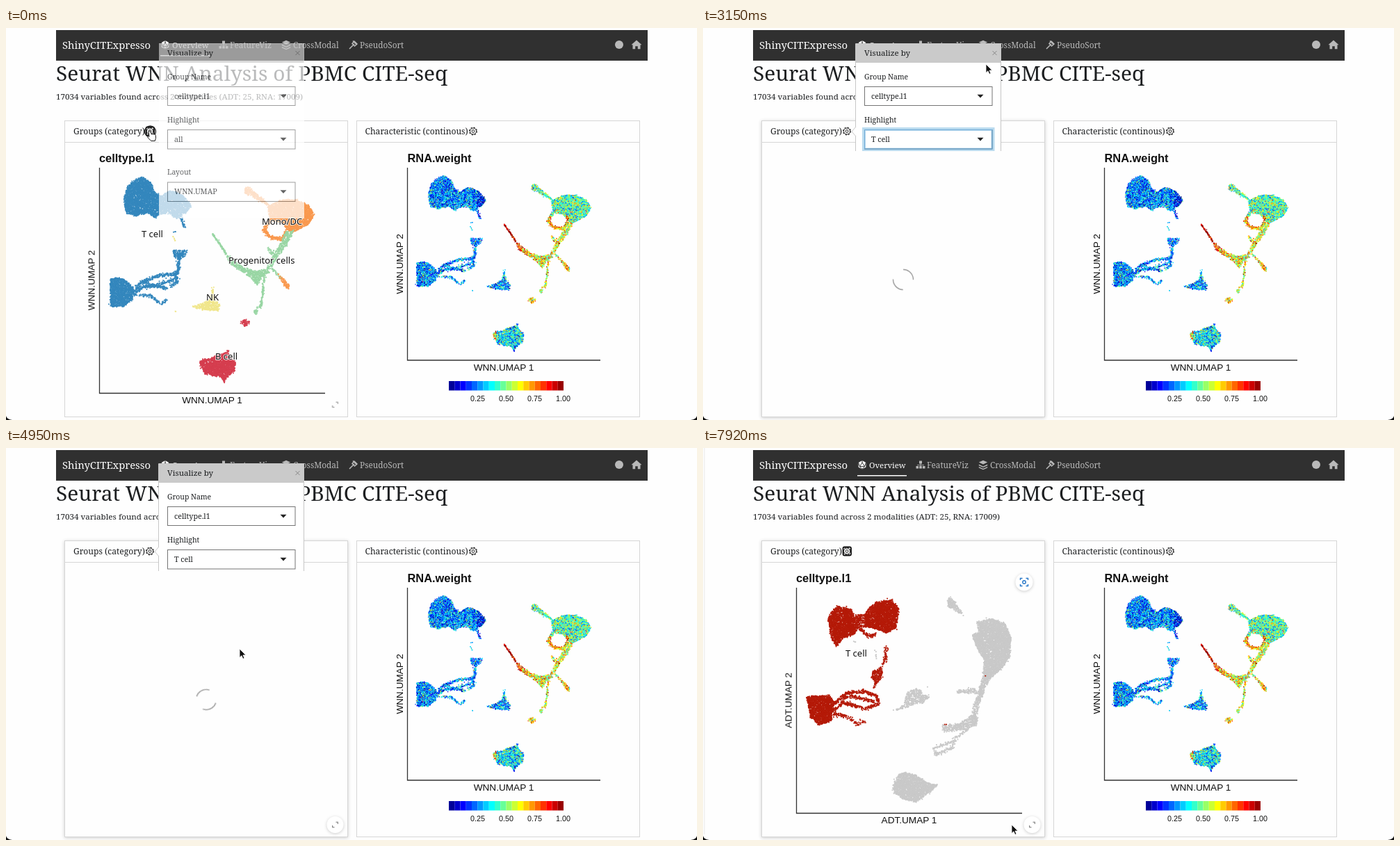
Recreate the animation shown at these times as an HTML page with a canvas. Size 994 by 564 pixels, loop 8 s.

```html
<!DOCTYPE html>
<html lang="en">
<head>
<meta charset="utf-8">
<title>ShinyCITExpresso</title>
<style>
html, body { margin: 0; width: 100%; height: 100%; overflow: hidden; background: #fefefe; }
canvas, svg, .card { position: absolute; left: 0; top: 0; }
.card { box-sizing: border-box; left: 84px; top: 133px; width: 408px; height: 427px; background: #fefefe; border: 1px solid #d6d6d6; }
.card.right { left: 503.5px; }
text { font: 12.1px "Noto Serif", serif; fill: #1d1f21; }
.title { font-size: 29.9px; }
.sub { font-size: 11.65px; }
.brand { font-size: 14.8px; font-weight: 500; fill: #fff; }
.nav text { font-size: 11.8px; fill: #b9b9b9; }
.nav .on { font-weight: 500; font-size: 11.4px; fill: #fff; }
.pop text { font-size: 10.7px; }
.pop .label { font-size: 10.4px; }
.pop .head { font-size: 11.5px; }
.pop .inv { fill: #fff; }
.box { fill: #fff; stroke: #747474; }
.glow { fill: none; stroke: #007bc2; stroke-opacity: .27; stroke-width: 5; }
.blue { fill: none; stroke: #6fa9d6; }
.menu { fill: #fff; stroke: #c9c9c9; filter: drop-shadow(0 2px 3px #0003); }
.axis { fill: none; stroke: #333; stroke-width: 1.3; }
.plot text { font: 13.6px "Liberation Sans", Arial, sans-serif; fill: #111; }
.plot .name { font-weight: bold; font-size: 16.4px; }
.plot .tick { font-size: 10.8px; text-anchor: middle; }
.plot .mid { text-anchor: middle; }
.plot .cell { font: 13px "Noto Sans", sans-serif; paint-order: stroke; stroke: #fff; stroke-opacity: .85; stroke-width: 2px; }
.round { fill: #fff; filter: drop-shadow(0 1px 2px #0003); }

/* 1% is 80 ms */
.a { animation: 8s step-end infinite; }
#spin { animation: turn 1s linear infinite; transform-origin: 288px 362px; }
@keyframes turn { from { transform: rotate(-144deg) } to { transform: rotate(216deg) } }
@keyframes shadow { 0% { box-shadow: none } 7.5%, 100% { box-shadow: 0 1px 5px #0003 } }
@keyframes popover { 0% { opacity: .7 } 1.875% { opacity: 1 } 87.875% { opacity: .4 } 89.75%, 100% { opacity: 0 } }
@keyframes settled { 0% { opacity: 0 } 1.875%, 100% { opacity: 1 } }
@keyframes all { 0% { opacity: 1 } 33.75%, 100% { opacity: 0 } }
@keyframes picked { 0% { opacity: 0 } 33.75%, 100% { opacity: 1 } }
@keyframes red { 0% { opacity: 0 } 33.75% { opacity: 1 } 60%, 100% { opacity: 0 } }
@keyframes wnn { 0% { opacity: 1 } 60%, 100% { opacity: 0 } }
@keyframes adt { 0% { opacity: 0 } 60%, 100% { opacity: 1 } }
@keyframes focus2 { 0% { opacity: 0 } 18.75% { opacity: 1 } 50.625%, 100% { opacity: 0 } }
@keyframes focus3 { 0% { opacity: 0 } 50.625% { opacity: 1 } 84.375%, 100% { opacity: 0 } }
@keyframes edge3 { 0% { opacity: 0 } 50.625%, 100% { opacity: 1 } }
@keyframes menu2 { 0% { opacity: 0 } 18.75% { opacity: 1 } 33.75%, 100% { opacity: 0 } }
@keyframes menu3 { 0% { opacity: 0 } 52.5% { opacity: 1 } 60%, 100% { opacity: 0 } }
@keyframes hover2 { 0% { opacity: 0 } 24.375% { opacity: 1; transform: none } 26.25%, 100% { opacity: 1; transform: translateY(21.8px) } }
@keyframes hover3 { 0% { opacity: 0 } 56.25%, 100% { opacity: 1 } }
@keyframes busy { 0% { opacity: 0 } 33.75% { opacity: 1 } 43.125% { opacity: 0 } 60% { opacity: 1 } 67.5%, 100% { opacity: 0 } }
@keyframes faint { 0% { opacity: .8 } 7.5%, 100% { opacity: 0 } }
@keyframes expand { 0% { opacity: 0 } 61.875% { opacity: 1 } 75% { opacity: 0 } 89.75%, 100% { opacity: 1 } }
@keyframes zoom { 0% { opacity: 0 } 67.5% { opacity: 1 } 75% { opacity: 0 } 89.75%, 100% { opacity: 1 } }
@keyframes gear { 0% { opacity: 1 } 1.875% { opacity: 0 } 86%, 100% { opacity: 1 } }
@keyframes edge { 0% { opacity: 0 } 99%, 100% { opacity: 1 } }
@keyframes ring {
  0%, 16.875%, 31.875%, 50.625%, 58.125%, 86% { opacity: 1 }
  1.875%, 18.75%, 33.75%, 52.5%, 60%, 87.875%, 100% { opacity: 0 }
}
@keyframes hand {
  0%, 16.875%, 46.875%, 82.5% { opacity: 1 }
  9.375%, 35.625%, 60%, 89.75%, 100% { opacity: 0 }
}
@keyframes arrow {
  0%, 16.875%, 46.875%, 82.5% { opacity: 0 }
  9.375%, 35.625%, 60%, 89.75%, 100% { opacity: 1 }
}
#cursor { animation: move 8s linear infinite; }
@keyframes move {
  0% { transform: translate(207px, 149px) }
  7.5% { transform: translate(207px, 149px); animation-timing-function: steps(2, start) }
  11.25% { transform: translate(245px, 116px); animation-timing-function: steps(5, start) }
  20.625% { transform: translate(327px, 160px); animation-timing-function: steps(3, start) }
  26.25% { transform: translate(324px, 215px); animation-timing-function: steps(2, start) }
  30% { transform: translate(320px, 237px) }
  33.75% { transform: translate(320px, 237px); animation-timing-function: steps(4, start) }
  41.25% { transform: translate(407px, 52px) }
  45% { transform: translate(407px, 52px); animation-timing-function: steps(2, start) }
  48.75% { transform: translate(343px, 236px) }
  52.5% { transform: translate(343px, 236px); animation-timing-function: steps(2, start) }
  56.25% { transform: translate(338px, 269px); animation-timing-function: steps(1, start) }
  58.125% { transform: translate(336px, 289px) }
  73.125% { transform: translate(336px, 289px); animation-timing-function: steps(6, start) }
  84.375% { transform: translate(418px, 36px) }
  87.875% { transform: translate(418px, 36px); animation-timing-function: steps(7, start) }
  100% { transform: translate(444px, 542px) }
}
</style>
</head>
<body>
<div class="card a" style="animation-name:shadow"></div>
<div class="card right"></div>
<canvas id="plotAll" class="a" style="animation-name:all"></canvas>
<canvas id="plotRed" class="a" style="animation-name:red"></canvas>
<canvas id="plotAdt" class="a" style="animation-name:adt"></canvas>
<canvas id="plotWeight"></canvas>

<svg width="994" height="564" viewBox="0 0 994 564">
  <defs>
    <path id="down" d="M-4.5-2.2h9L0 2.6z" fill="#222"/>
    <path id="up" d="M-4.5 2.2h9L0-2.6z" fill="#222"/>
    <g id="cog" fill="none" stroke="#222">
      <circle r="4.5"/><circle r="1.9"/>
      <circle r="5.4" stroke-width="1.2" stroke-dasharray="2.1 2.14"/>
    </g>
    <path id="corners" d="M1 -3.8h2.8v2.8M-1 3.8h-2.8v-2.8" fill="none" stroke="#777" stroke-width="1.1"/>
  </defs>

  <rect x="72" y="3" width="851" height="44" fill="#303030"/>
  <text class="brand" x="81" y="30">ShinyCITExpresso</text>
  <g class="nav">
    <path d="M229 18l5.4 3v6.4l-5.4 3-5.4-3V21z" fill="#fff"/>
    <path d="M229 18v3l-3.6 5.6h7.2L229 21M223.6 21l1.8 5.6 3.6 3.8 3.6-3.8 1.8-5.6" fill="none" stroke="#303030"/>
    <text class="on" x="239" y="28.5">Overview</text>
    <path d="M222 39.7h71" stroke="#fff" stroke-width="1.6"/>
    <path d="M311 18.5h4v4h-4zM306.5 26h3.6v3.6h-3.6zM311.2 26h3.6v3.6h-3.6zM315.9 26h3.6v3.6h-3.6zM312.6 22h.9v4h-.9zM308 24h10v.8h-10z" fill="#b9b9b9"/>
    <text x="322" y="28.5">FeatureViz</text>
    <path d="M403 17.8l6.2 2.8-6.2 2.8-6.2-2.8zM396.8 23.6l6.2 2.8 6.2-2.8v1.7l-6.2 2.8-6.2-2.8zM396.8 27l6.2 2.8 6.2-2.8v1.5l-6.2 2.8-6.2-2.8z" fill="#b9b9b9"/>
    <text x="413" y="28.5">CrossModal</text>
    <path d="M494 30l7-7M499 18.5l5.5 5.5M498 22.5l3-3.5 4 4-3.5 3z" fill="none" stroke="#b9b9b9" stroke-width="1.5"/>
    <text x="509" y="28.5">PseudoSort</text>
    <circle cx="882" cy="24" r="6" fill="#b9b9b9"/>
    <path d="M907 17.5l7.5 6.7h-2v6h-3.7v-4h-3.6v4h-3.7v-6h-2z" fill="#b9b9b9"/>
  </g>
  <text class="title" x="72" y="76">Seurat WNN Analysis of PBMC CITE-seq</text>
  <text class="sub" x="72" y="103">17034 variables found across 2 modalities (ADT: 25, RNA: 17009)</text>

  <path d="M85 164.5h406M504 164.5h407" stroke="#d6d6d6"/>
  <text x="97" y="153">Groups (category)</text>
  <use href="#cog" x="207" y="148.5"/>
  <rect class="a" style="animation-name:gear" x="201.5" y="142.5" width="11.5" height="12" rx="2" fill="none" stroke="#111" stroke-width="1.8"/>
  <text x="516.5" y="153">Characteristic (continous)</text>
  <use href="#cog" x="672" y="148.5"/>

  <g class="plot">
    <path class="axis" d="M134.5 201V525.5H459M577.5 201V478H855"/>
    <text class="name" x="134" y="193">celltype.l1</text>
    <text class="name" x="577.5" y="193">RNA.weight</text>
    <g class="a" style="animation-name:wnn">
      <text class="mid" x="296.5" y="540">WNN.UMAP 1</text>
      <text class="mid" transform="translate(127.5 363) rotate(-90)">WNN.UMAP 2</text>
      <text class="cell" x="195" y="301">T cell</text>
    </g>
    <g class="a" style="animation-name:adt">
      <text class="mid" x="296.5" y="540">ADT.UMAP 1</text>
      <text class="mid" transform="translate(127.5 363) rotate(-90)">ADT.UMAP 2</text>
      <text class="cell" x="205" y="300">T cell</text>
    </g>
    <g class="a" style="animation-name:all">
      <text class="cell" x="368" y="283">Mono/DC</text>
      <text class="cell" x="320" y="338.5">Progenitor cells</text>
      <text class="cell" x="288" y="392">NK</text>
      <text class="cell" x="301" y="477">B cell</text>
    </g>
    <text class="mid" x="716" y="493">WNN.UMAP 1</text>
    <text class="mid" transform="translate(570.5 339.5) rotate(-90)">WNN.UMAP 2</text>
    <text class="tick" x="678.5" y="536.5">0.25</text>
    <text class="tick" x="719.5" y="536.5">0.50</text>
    <text class="tick" x="760.5" y="536.5">0.75</text>
    <text class="tick" x="801.5" y="536.5">1.00</text>
  </g>
  <use class="a" style="animation-name:faint" href="#corners" x="473.5" y="542"/>

  <g class="pop a" style="animation-name:popover">
    <path d="M220 22h209v252H220z" fill="#fff"/>
    <path d="M220 22.5h208.5V50H220z" fill="#cacaca"/>
    <g class="a" style="animation-name:settled" stroke="#c6c6c6">
      <path d="M219.5 22.5h209V274h-209zM232 187h184" fill="none"/>
      <path d="M220 142l-6 7 6 7" fill="#fff"/>
    </g>
    <path d="M416.5 33l6 6m0-6l-6 6" stroke="#888"/>
    <text class="head" x="232" y="40">Visualize by</text>
    <text class="label" x="232" y="74">Group Name</text>
    <text class="label" x="232" y="136">Highlight</text>
    <text class="label" x="232" y="211">Layout</text>
    <rect class="box" x="232.5" y="84.5" width="183.5" height="27"/>
    <rect class="box" x="232.5" y="146.5" width="183.5" height="27.5"/>
    <rect class="box" x="232.5" y="222" width="183.5" height="27.5"/>
    <rect class="blue a" style="animation-name:edge3" x="232.5" y="222" width="183.5" height="27.5"/>
    <g class="a" style="animation-name:focus2">
      <rect class="glow" x="231.5" y="145.5" width="185.5" height="29.5"/>
      <rect class="blue" x="232.5" y="146.5" width="183.5" height="27.5"/>
    </g>
    <rect class="glow a" style="animation-name:focus3" x="231.5" y="221" width="185.5" height="29.5"/>
    <use href="#down" x="399" y="98"/>
    <use href="#down" x="399" y="160"/>
    <use href="#down" x="399" y="235.5"/>
    <text x="242" y="102">celltype.l1</text>
    <text class="a" style="animation-name:all" x="242" y="164">all</text>
    <text class="a" style="animation-name:picked" x="242" y="164">T cell</text>
    <text class="a" style="animation-name:wnn" x="242" y="239">WNN.UMAP</text>
    <text class="a" style="animation-name:adt" x="242" y="239">ADT.UMAP</text>

    <g class="a" style="animation-name:menu2">
      <path d="M394 156h10v8h-10z" fill="#fff"/>
      <use href="#up" x="399" y="159.5"/>
      <path d="M255.5 154v13" stroke="#222"/>
      <rect class="menu" x="232.5" y="179.5" width="183.5" height="135.5"/>
      <rect x="233" y="180" width="183" height="22" fill="#007bc2"/>
      <rect class="a" style="animation-name:hover2" x="233" y="202" width="183" height="21.8" fill="#e2e2e2"/>
      <text class="inv" x="242" y="195">all</text>
      <text x="242" y="217">Progenitor cells</text>
      <text x="242" y="238.5">T cell</text>
      <text x="242" y="260">Mono/DC</text>
      <text x="242" y="282">B cell</text>
      <text x="242" y="304">NK</text>
    </g>
    <g class="a" style="animation-name:menu3">
      <path d="M394 231h10v8h-10z" fill="#fff"/>
      <use href="#up" x="399" y="235"/>
      <path d="M307.5 229v13" stroke="#222"/>
      <rect class="menu" x="232.5" y="255" width="183.5" height="69.5"/>
      <rect x="233" y="255.5" width="183" height="22" fill="#007bc2"/>
      <rect class="a" style="animation-name:hover3" x="233" y="277.5" width="183" height="21.8" fill="#e2e2e2"/>
      <text class="inv" x="242" y="270">WNN.UMAP</text>
      <text x="242" y="292">ADT.UMAP</text>
      <text x="242" y="314">RNA.UMAP</text>
    </g>
  </g>

  <g class="a" style="animation-name:busy">
    <rect x="85" y="177" width="406" height="382" fill="#fefefe"/>
    <circle id="spin" cx="288" cy="362" r="14.5" fill="none" stroke="#a3a3a3" stroke-width="1.7" stroke-dasharray="22.78"/>
  </g>
  <g class="a" style="animation-name:zoom">
    <circle class="round" cx="462" cy="193" r="12.5"/>
    <g fill="none" stroke="#2878c8" stroke-width="1.4">
      <circle cx="462" cy="193" r="2.2"/>
      <path d="M456.5 190v-2.5h3M464.5 187.5h3v2.5M467.5 196v2.5h-3M459.5 198.5h-3v-2.5"/>
    </g>
  </g>
  <g class="a" style="animation-name:expand">
    <circle class="round" cx="473.5" cy="542" r="12"/>
    <use href="#corners" x="473.5" y="542"/>
  </g>
  <path class="a" style="animation-name:edge" d="M2 0v556" stroke="#e8e8e8"/>
  <path d="M0 558q1 5 9 6H0zM994 558q-1 5-9 6h9z" fill="#111"/>

  <g id="cursor">
    <circle class="a" style="animation-name:ring" cx=".5" r="8" fill="none" stroke="#222" stroke-width="1.3"/>
    <path class="a" style="animation-name:arrow" d="M0 0v12.5l2.9-2.7 2 4.5 2.1-.9-2-4.4h4z" fill="#111" stroke="#fff" stroke-width=".8"/>
    <path class="a" style="animation-name:hand" d="M-1.800 0q1.300-1.400 2.600 0l1.600 4 1.500-.6 1.500.5 1.500-.1 1.300 1.600.3 4-1.200 4H1.800L-2.600 9.200-3.600 6.500q1-.8 2.500.9z" fill="#fff" stroke="#111"/>
  </g>
</svg>

<script>
let seed = 7;
const random = () => (seed = seed * 16807 % 2147483647) / 2147483647;
const bell = () => random() + random() + random() - 1.5;
const clamp = v => Math.max(0, Math.min(1, v));
const probe = document.createElement('canvas').getContext('2d');

// Scatter points inside an outline, or as a soft strand along a line when width is given.
function scatter(cells, type, d, density = 1.3, width = 0) {
  const path = new Path2D(d), n = d.match(/[\d.]+/g).map(Number);
  const xs = n.filter((_, i) => i % 2 === 0), ys = n.filter((_, i) => i % 2);
  const left = Math.min(...xs) - width, top = Math.min(...ys) - width;
  const w = Math.max(...xs) + width - left, h = Math.max(...ys) + width - top;
  const blur = width ? width * .35 : 1.2;
  probe.lineWidth = width * .4;
  for (let i = w * h * density * (width ? 3 : 1); i > 0; i--) {
    const x = left + random() * w, y = top + random() * h;
    const hit = width ? probe.isPointInStroke(path, x, y) : probe.isPointInPath(path, x, y);
    if (!hit) continue;
    const spread = random() < .05 ? blur + 2 : blur;
    cells.push({ type, x: x + bell() * spread, y: y + bell() * spread });
  }
}

function wnnCells() {
  const cells = [], add = (...args) => scatter(cells, ...args);
  add('t', 'M170 246 175 229 186 218 196 215 208 222 214 237 224 242 237 234 254 240 266 255 262 263 245 274 234 266 220 268 214 274 206 266 186 270 173 266Z');
  add('t', 'M250 270 257 286', .3, 6);
  add('t', 'M244 288 244 302', .1, 3);
  add('t', 'M240 320 261 320 258 327 250 333 247 330 242 329Z', .8);
  add('t', 'M249 328 248 347 244 355', .6, 6);
  add('t', 'M150 361 160 359 172 363 183 374 182 391 169 400 151 401Z');
  add('t', 'M183 377 195 366 220 356 244 354 247 364 236 372', .5, 6);
  add('t', 'M183 381 197 373 212 370 232 375', .5, 6);
  add('t', 'M198 364 210 372 244 361', .3, 6);
  add('t', 'M183 384 208 385 222 397 231 391', .3, 5);
  add('mono', 'M344 230 350 229 356 236 370 247 381 257 366 249 352 241 344 238Z');
  add('mono', 'M377 257 395 248 418 247 436 256 443 269 436 282 420 290 410 295 403 288 396 279 380 277Z');
  add('mono', 'M379 276 371 291 380 301 397 304 404 292', .6, 6);
  add('prog', 'M297 296 317 325', .9, 2.5);
  add('prog', 'M315 323 325 332 341 344 358 350 376 347 379 352 368 360 361 370 353 360 337 349 322 339Z', .75);
  add('prog', 'M402 293 415 290 404 313 392 328 380 348 375 346 386 326 396 308Z', .7);
  add('prog', 'M387 328 377 316', .3, 7);
  add('prog', 'M371 354 370 378 366 400', .4, 4);
  add('prog', 'M368 398 357 410', .3, 6);
  add('prog', 'M382 346 396 360', .3, 4);
  add('mono', 'M390 353 399 361 408 370 407 375 401 373 396 362Z', .8);
  add('b', 'M338 423 344 419 351 423 344 430Z', .9);
  add('nk', 'M267 401 284 396 294 389 297 377 300 389 308 398 306 406 284 406Z', .9);
  add('nk', 'M297 373 298 390', .3, 4);
  add('nk', 'M241 300 244 307M243 408 245 408', .2, 2);
  add('b', 'M278 479 298 474 309 469 318 466 320 471 330 481 329 493 318 502 314 510 310 502 299 500 285 497Z');
  add('b', 'M319 462 320 474', .3, 4);
  return cells;
}

function adtCells() {
  const cells = [], add = (...args) => scatter(cells, ...args);
  add('t', 'M180 245 186 234 193 228 213 232 218 244 224 259 217 268 202 273 192 285 185 274Z');
  add('t', 'M233 240 238 231 250 222 271 218 282 231 278 258 264 266 246 259 234 257Z');
  add('t', 'M219 240 236 240 236 257 222 259Z', .7);
  add('t', 'M226 260 240 272 250 267', .4, 6);
  add('t', 'M264 285 262 307', .2, 7);
  add('t', 'M261 307 254 321', .3, 4);
  add('t', 'M243 322 254 317 259 323 254 334 249 340 243 332Z', .9);
  add('t', 'M249 335 246 345', .4, 4);
  add('t', 'M149 358 182 356 189 367 184 392 167 399 155 388Z');
  add('t', 'M188 368 207 353 231 350 250 357 252 368 235 375', .45, 6);
  add('t', 'M188 378 201 366 215 370 235 376', .4, 6);
  add('t', 'M198 360 215 357 246 365', .3, 6);
  add('t', 'M188 383 210 387 222 399 231 392', .3, 6);
  add('mono', 'M351 219 355 215 363 222 376 242 365 235 354 230Z', .8);
  add('mono', 'M394 250 414 246 434 252 443 273 441 300 430 317 412 332 403 330 405 303 395 290 387 269 397 265Z');
  add('prog', 'M403 329 412 331 404 352 396 370 394 390 385 391 390 370 396 350Z', .8);
  add('prog', 'M365 349 392 346 396 353 366 352Z', .8);
  add('prog', 'M386 385 395 386 394 398 372 406 345 408 345 399 369 397Z', .85);
  add('prog', 'M382 404 362 418 360 430 335 441 333 432 358 422', .3, 6);
  add('nk', 'M275 378 289 369 294 352 305 346 314 348 314 355 327 357 316 367 304 368 293 374Z', .65);
  add('nk', 'M322 344 325 341M213 277 220 280M248 290 250 305', .12, 3);
  add('b', 'M273 487 282 469 291 467 306 471 323 482 337 485 326 495 307 509 289 506 276 497Z');
  add('t', 'M406 328 407 328M396 384 397 384M347 398 351 398', .5, 1.5);
  return cells;
}

function jet(v) {
  const part = c => Math.round(255 * clamp(1.5 - Math.abs(4 * v - c)));
  return `rgb(${part(3)},${part(2)},${part(1)})`;
}

// Weight of a cell: a mean for its type and place, plus noise.
function weight({ type, x, y }) {
  const base = { t: .25, mono: .45, prog: .58, nk: .27, b: .35 }[type];
  let shift = 0;
  if (type === 'prog') shift = .38 * clamp((350 - x) / 45);
  if (type === 'mono' && y > 283 && x < 406) shift = .25;
  if (type === 'b' && (x < 284 || y < 440)) shift = .35;
  if (type === 'b' && y > 500 || type === 't' && x > 252 && y < 290) shift = -.13;
  const stray = random() < .05 ? .25 : 0;
  return clamp(base + shift + stray + bell() * .28);
}

function paint(id, cells, color, size, place = p => p) {
  const canvas = document.getElementById(id), ctx = canvas.getContext('2d');
  canvas.width = 994;
  canvas.height = 564;
  for (const cell of cells) {
    const { x, y } = place(cell);
    ctx.fillStyle = color(cell);
    ctx.fillRect(x - size / 2, y - size / 2, size, size);
  }
  return ctx;
}

const wnn = wnnCells(), adt = adtCells();
const palette = { t: '#3487bd', mono: '#f9994f', prog: '#99d6a4', nk: '#f0e68c', b: '#d53e4f' };
const highlight = cell => cell.type === 't' ? '#b41a08' : '#c9c9c9';
paint('plotAll', wnn, cell => palette[cell.type], 1.8);
paint('plotRed', wnn, highlight, 1.8);
paint('plotAdt', adt, highlight, 1.8);

const scale = 277 / 324;
const legend = paint('plotWeight', wnn, cell => jet(weight(cell)), 1.4,
  ({ x, y }) => ({ x: 577.5 + (x - 134.5) * scale, y: 201 + (y - 201) * scale }));
for (let i = 0; i < 20; i++) {
  legend.fillStyle = jet((i + .5) / 20);
  legend.fillRect(637 + i * 8.25, 508, 8.25, 13.5);
}
</script>
</body>
</html>
```
